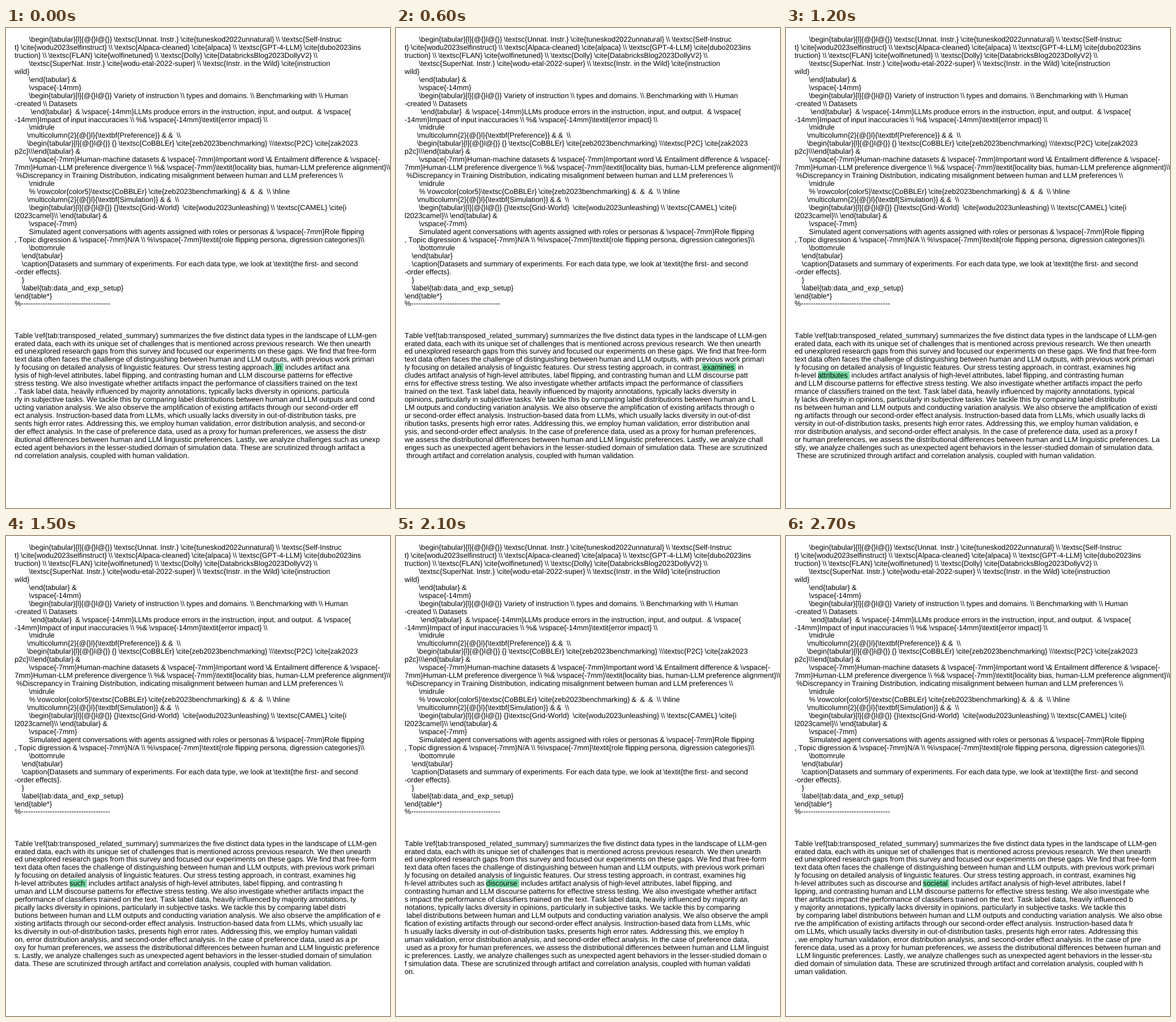
Animation of 670 by 836 pixels, one loop 3 s. Source, as an HTML page:

```html
<!DOCTYPE html>
<html lang="en">
<head>
<meta charset="utf-8">
<title>Word by word insertion</title>
<style>
html, body {
  margin: 0;
  width: 100%;
  height: 100%;
  overflow: hidden;
  background: #fff;
}
pre {
  position: absolute;
  left: 15px;
  right: 0;
  margin: 0;
  overflow: hidden;
  font: 12.7px/13.95px "Liberation Sans", Arial, sans-serif;
  word-spacing: -0.38px;
  font-kerning: none;
  font-variant-ligatures: none;
  text-rendering: geometricPrecision;
  color: #000;
}
#code { top: 14px; font-size: 12.62px; }
#prose { top: 529.55px; }
mark { background: #78dba5; color: inherit; }
</style>
</head>
<body>
<pre id="code">
        \begin{tabular}[l]{@{}l@{}} \textsc{Unnat. Instr.} \cite{tuneskod2022unnatural} \\ \textsc{Self-Instruc
t} \cite{wodu2023selfinstruct} \\ \textsc{Alpaca-cleaned} \cite{alpaca} \\ \textsc{GPT-4-LLM} \cite{dubo2023ins
truction} \\ \textsc{FLAN} \cite{wolfinetuned} \\ \textsc{Dolly} \cite{DatabricksBlog2023DollyV2} \\
        \textsc{SuperNat. Instr.} \cite{wodu-etal-2022-super} \\ \textsc{Instr. in the Wild} \cite{instruction
wild}
        \end{tabular} &amp;
        \vspace{-14mm}
        \begin{tabular}[l]{@{}l@{}} Variety of instruction \\ types and domains. \\ Benchmarking with \\ Human
-created \\ Datasets
         \end{tabular}  &amp; \vspace{-14mm}LLMs produce errors in the instruction, input, and output.  &amp; \vspace{
-14mm}Impact of input inaccuracies \\ %&amp; \vspace{-14mm}\textit{error impact} \\
        \midrule
       \multicolumn{2}{@{}l}{\textbf{Preference}} &amp; &amp;  \\
       \begin{tabular}[l]{@{}l@{}} {} \textsc{CoBBLEr} \cite{zeb2023benchmarking} \\\textsc{P2C} \cite{zak2023
p2c}\\\end{tabular} &amp;
        \vspace{-7mm}Human-machine datasets &amp; \vspace{-7mm}Important word \&amp; Entailment difference &amp; \vspace{-
7mm}Human-LLM preference divergence \\ %&amp; \vspace{-7mm}\textit{locality bias, human-LLM preference alignment}\\
 %Discrepancy in Training Distribution, indicating misalignment between human and LLM preferences \\
        \midrule
        % \rowcolor{color5}\textsc{CoBBLEr} \cite{zeb2023benchmarking} &amp;  &amp;  &amp;  \\ \hline
       \multicolumn{2}{@{}l}{\textbf{Simulation}} &amp; &amp;  \\
        \begin{tabular}[l]{@{}l@{}} {}\textsc{Grid-World}  \cite{wodu2023unleashing} \\ \textsc{CAMEL} \cite{i
l2023camel}\\ \end{tabular} &amp;
        \vspace{-7mm}
        Simulated agent conversations with agents assigned with roles or personas &amp; \vspace{-7mm}Role flipping
, Topic digression &amp; \vspace{-7mm}N/A \\ %\vspace{-7mm}\textit{role flipping persona, digression categories}\\
        \bottomrule
    \end{tabular}
    \caption{Datasets and summary of experiments. For each data type, we look at \textit{the first- and second
-order effects}.
    }
    \label{tab:data_and_exp_setup}
\end{table*}
%-------------------------------------
</pre>
<pre id="prose"></pre>
<script>
const STEP = 300;
const COLUMNS = 111;
const words = ['in', 'contrast,', 'examines', 'high-level', 'attributes',
  'such', 'as', 'discourse', 'and', 'societal'];

const head = String.raw`Table \ref{tab:transposed_related_summary} summarizes ` +
  'the five distinct data types in the landscape of LLM-generated data, each with its ' +
  'unique set of challenges that is mentioned across previous research. We then unearthed ' +
  'unexplored research gaps from this survey and focused our experiments on these gaps. ' +
  'We find that free-form text data often faces the challenge of distinguishing between ' +
  'human and LLM outputs, with previous work primarily focusing on detailed analysis of ' +
  'linguistic features. Our stress testing approach,';

const tail = ' includes artifact analysis of high-level attributes, label flipping, and ' +
  'contrasting human and LLM discourse patterns for effective stress testing. We also ' +
  'investigate whether artifacts impact the performance of classifiers trained on the text. ' +
  'Task label data, heavily influenced by majority annotations, typically lacks diversity ' +
  'in opinions, particularly in subjective tasks. We tackle this by comparing label ' +
  'distributions between human and LLM outputs and conducting variation analysis. We also ' +
  'observe the amplification of existing artifacts through our second-order effect analysis. ' +
  'Instruction-based data from LLMs, which usually lacks diversity in out-of-distribution ' +
  'tasks, presents high error rates. Addressing this, we employ human validation, error ' +
  'distribution analysis, and second-order effect analysis. In the case of preference data, ' +
  'used as a proxy for human preferences, we assess the distributional differences between ' +
  'human and LLM linguistic preferences. Lastly, we analyze challenges such as unexpected ' +
  'agent behaviors in the lesser-studied domain of simulation data. These are scrutinized ' +
  'through artifact and correlation analysis, coupled with human validation.';

// Hard wrap by character count; the first line is one character shorter.
function wrap(text, from, to) {
  let out = '';
  for (let k = from; k < to; k++) {
    if ((k + 1) % COLUMNS === 0) out += '\n';
    out += text[k];
  }
  return out;
}

function compose(i) {
  const before = [head, ...words.slice(0, i)].join(' ');
  const inserted = before + ' ' + words[i] + ' ';
  const text = inserted + tail;
  const start = before.length + (before.endsWith(',') ? 0 : 1);
  const end = inserted.length;
  return [wrap(text, 0, start), wrap(text, start, end), wrap(text, end, text.length)];
}

const states = words.map((_, i) => compose(i));
const prose = document.getElementById('prose');
let shown = -1;

function draw() {
  const i = Math.floor(performance.now() / STEP) % states.length;
  if (i !== shown) {
    const [left, word, right] = states[i];
    const mark = document.createElement('mark');
    mark.textContent = word;
    prose.replaceChildren(left, mark, right);
    shown = i;
  }
  requestAnimationFrame(draw);
}
draw();
</script>
</body>
</html>
```
